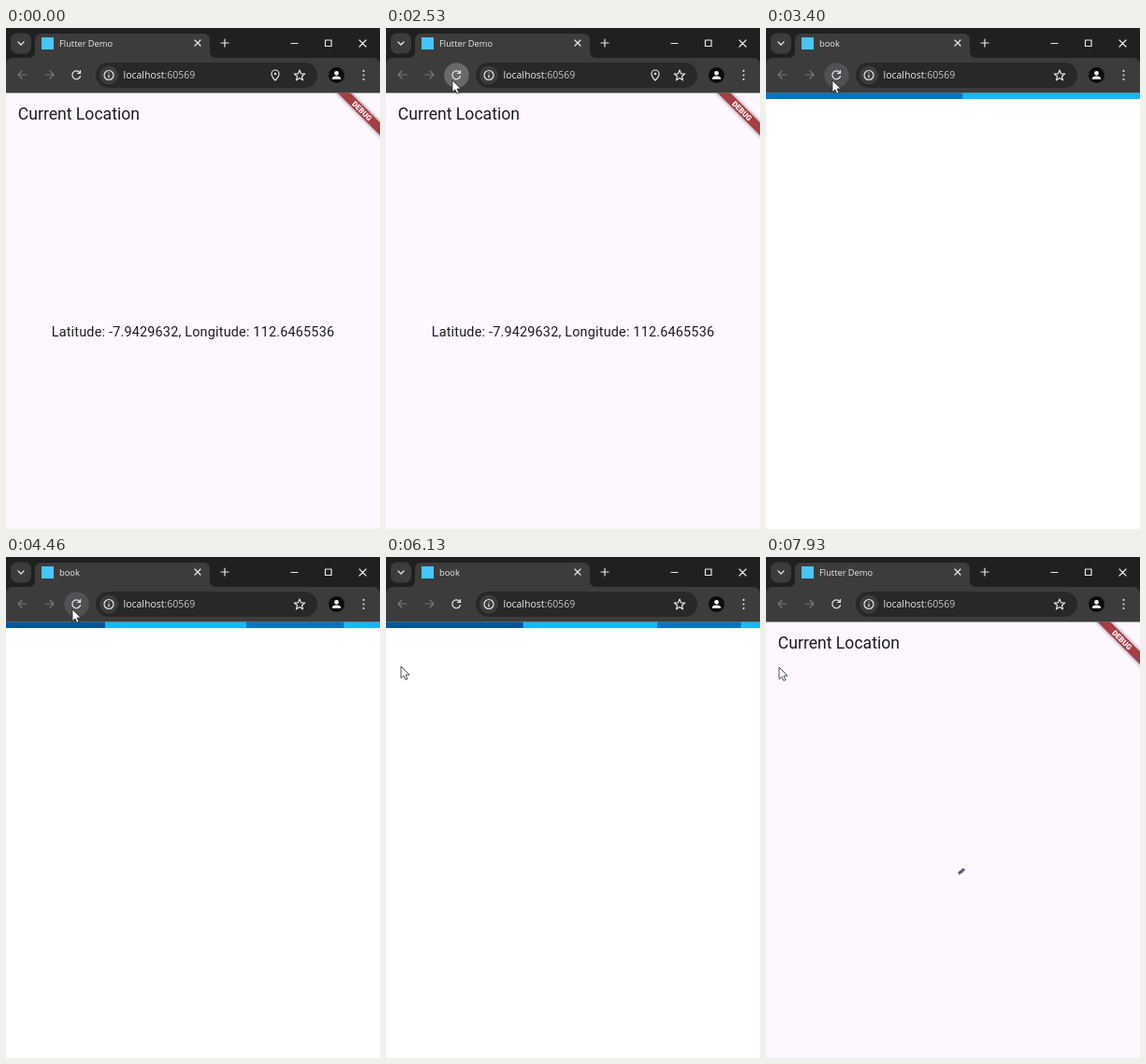
Recreate the animation shown at these times as an HTML page. Size 400 by 536 pixels, loop 8 s.

```html
<!DOCTYPE html>
<html lang="en">
<head>
<meta charset="utf-8">
<title>Current Location</title>
<style>
  html, body { margin: 0; width: 100%; height: 100%; overflow: hidden; background: #fff; }
  svg { display: block; width: 100%; height: 100%; }
  .ui { font-family: "Open Sans", "Noto Sans", sans-serif; fill: #ececec; }
  .app { font-family: Roboto, sans-serif; fill: #1d1b20; }
  .line { fill: none; stroke: #e8e8e8; stroke-width: 1.2; stroke-linecap: round; stroke-linejoin: round; }
  .dim { stroke: #777; }
  .dots { stroke-width: 2; }
  .strip { fill: #1f2020; }
  .bar { fill: #3c3c3c; }
  .pill { fill: #282828; }
</style>
</head>
<body>
<svg viewBox="0 0 400 536" preserveAspectRatio="none">
  <defs>
    <clipPath id="view"><rect y="69.5" width="400" height="466.5"/></clipPath>
    <filter id="soft" x="-30%" y="-100%" width="160%" height="300%"><feGaussianBlur stdDeviation="2"/></filter>
  </defs>

  <rect id="page" width="400" height="536"/>

  <g id="loader">
    <rect y="69.5" width="400" height="6.5" fill="#13b9fd"/>
    <rect id="first" y="69.5" height="6.5" fill="#0175c2"/>
    <rect id="second" y="69.5" height="6.5" fill="#02569b"/>
  </g>

  <g id="app" class="app" clip-path="url(#view)">
    <text x="12.8" y="98" font-size="17.6">Current Location</text>
    <text id="place" x="200" y="330.4" font-size="14.4" letter-spacing=".2" text-anchor="middle">Latitude: -7.9429632, Longitude: 112.6465536</text>
    <path id="spinner" fill="none" stroke="#65558f" stroke-width="3.2"/>
    <g transform="translate(400 69.5) rotate(45)">
      <rect x="-36" y="22.4" width="72" height="9.6" opacity=".5" fill="#000" filter="url(#soft)"/>
      <rect x="-36" y="22.4" width="72" height="9.6" fill="#a73d45"/>
      <text y="30.1" font-size="8.1" font-weight="900" text-anchor="middle" fill="#fff">DEBUG</text>
    </g>
  </g>

  <g id="chrome">
    <rect class="strip" width="400" height="42"/>
    <path class="bar" d="M0 69.5V40q0-8 8-8H24q7 0 7-7V13q0-7 7-7H211q7 0 7 7V25q0 7 7 7H392q8 0 8 8V69.5z"/>
    <rect class="bar" x="5" y="5.5" width="22" height="22" rx="7"/>
    <path class="line" d="M13 15l3 3 3-3"/>
    <rect x="38" y="10" width="13" height="13" fill="#47c5fb"/>
    <text id="tab" class="ui" x="57" y="20" font-size="9.3"></text>
    <path class="line" d="M202 13l6 6m0-6l-6 6M230 16h8m-4-4v8M305 16.5h7M341.5 13h6.500v6.500h-6.500zM378 13l7 7m0-7l-7 7"/>
    <path class="line dim" d="M22 50H13m4-4l-4 4 4 4M42 50h9m-4-4l4 4-4 4"/>
    <circle id="hover" cx="75.5" cy="50.5" r="13.3"/>
    <path class="line" d="M78.8 47.7A4.4 4.4 0 1 0 79.5 51.5M79.5 45.5v3h-3"/>
    <rect class="pill" x="96" y="37" width="237" height="27" rx="13.5"/>
    <circle class="bar" cx="110" cy="50.5" r="10"/>
    <circle class="line" cx="110" cy="50.5" r="5"/>
    <path class="line" d="M110 50.3v2.7M110 48v.1"/>
    <text class="ui" x="125.5" y="54" font-size="10.5">localhost<tspan fill="#c7c7c7">:60569</tspan></text>
    <g id="pin" class="line">
      <path d="M288 56q-4-4-4-7a4 4 0 0 1 8 0q0 3-4 7z"/>
      <circle cx="288" cy="49" r=".7"/>
    </g>
    <path id="star" class="line"/>
    <circle cx="353.5" cy="50.5" r="8.5" fill="#0c0c0c"/>
    <path d="M348.8 54.8q0-3.300 4.700-3.300t4.700 3.300z" fill="#fff"/>
    <circle cx="353.5" cy="48.3" r="2.4" fill="#fff"/>
    <path class="line dots" d="M382.5 45.800v.1m0 4.500v.1m0 4.500v.1"/>
  </g>

  <path id="cursor" d="M0 0V12.6L2.9 9.9 4.9 14.3 7 13.4 5 9.100H9z" fill="#fff" stroke="#222" stroke-width=".8"/>
</svg>

<script>
const LOOP = 8000, TICK = 200 / 3;
const ENTER = 60, PRESS = 2460, RELEASE = 2930, RELOAD = 3260, LEAVE = 5214, READY = 6860;
const LOADER_START = 2750;
const stalls = [[4030, 4530], [6130, 6460], [7330, 7660]];  // the page hangs while it loads

const $ = id => document.getElementById(id);
const show = (id, on) => { $(id).style.display = on ? "" : "none"; };
const clamp = v => Math.max(0, Math.min(1, v));
const progress = (t, from, to) => clamp((t - from) / (to - from));
const mix = (a, b, k) => a + (b - a) * k;

function bezier(x1, y1, x2, y2) {
  const curve = (a, b, s) => 3 * a * s * (1 - s) ** 2 + 3 * b * s * s * (1 - s) + s ** 3;
  return x => {
    let lo = 0, hi = 1;
    for (let i = 0; i < 22; i++) {
      const mid = (lo + hi) / 2;
      if (curve(x1, x2, mid) < x) lo = mid; else hi = mid;
    }
    return curve(y1, y2, (lo + hi) / 2);
  };
}
const easeOut = bezier(0, 0, .58, 1);
const easeIn = bezier(.42, 0, 1, 1);
const fastOutSlowIn = bezier(.4, 0, .2, 1);

function screenTime(t) {
  const tick = Math.floor((t + 7) / TICK) * TICK;
  const stall = stalls.find(([from, to]) => tick > from && tick < to - 7);
  return stall ? stall[0] : tick;
}

function drawLoader(t) {
  const phase = (t - LOADER_START) % 2000 / 2000;
  const place = (id, start, p) => {
    $(id).setAttribute("x", mix(start, 400, p));
    $(id).setAttribute("width", mix(400, 40, p));
  };
  place("first", -400, easeOut(phase));
  place("second", -600, easeIn(phase));
}

function drawSpinner(t) {
  const cycle = t % 1333 / 1333, turn = 2 * Math.PI;
  const head = fastOutSlowIn(clamp(cycle * 2));
  const tail = fastOutSlowIn(clamp(cycle * 2 - 1));
  const from = turn * (-.25 + tail * .75 + t / 2222 + cycle * .25);
  const sweep = Math.max(.001, (head - tail) * .75 * turn);
  const point = a => `${200 + 14.4 * Math.cos(a)} ${325.4 + 14.4 * Math.sin(a)}`;
  $("spinner").setAttribute("d",
    `M${point(from)}A14.4 14.4 0 ${sweep > Math.PI ? 1 : 0} 1 ${point(from + sweep)}`);
}

// The pointer glides in to the reload button, clicks it, then curves away to the left.
function drawCursor(t) {
  const arrive = easeOut(progress(t, ENTER, 1460));
  const leave = progress(t, LEAVE, 6130);
  const drift = progress(t, 6460, READY);
  const x = mix(400, 71, arrive) - 55 * leave - 2 * drift;
  const y = mix(300, 56, arrive) + 61 * leave ** 1.7 + drift;
  $("cursor").setAttribute("transform", `translate(${x} ${y})`);
  show("cursor", t >= ENTER);

  const pressed = t >= PRESS && t < RELEASE;
  $("hover").setAttribute("fill", pressed ? "#6a6a6a" : "#505055");
  $("hover").setAttribute("opacity", progress(t, 1330, 1460) - progress(t, 5600, 5800));
}

function draw(now) {
  const t = screenTime(now % LOOP);
  const located = t < RELOAD - 7, ready = t >= READY, loading = !located && !ready;

  show("app", !loading);
  show("loader", loading);
  show("place", located);
  show("pin", located);
  show("spinner", ready);
  $("page").setAttribute("fill", loading ? "#fff" : "#fef7ff");
  $("tab").textContent = loading ? "book" : "Flutter Demo";
  if (loading) drawLoader(t);
  if (ready) drawSpinner(t - READY);
  drawCursor(t);
}

const starPoints = Array.from({ length: 10 }, (_, i) => {
  const r = i % 2 ? 2.6 : 6, a = (i * 36 - 90) * Math.PI / 180;
  return `${314 + r * Math.cos(a)} ${51 + r * Math.sin(a)}`;
});
$("star").setAttribute("d", `M${starPoints.join("L")}z`);

const begin = performance.now();
function loop() {
  draw(performance.now() - begin);
  requestAnimationFrame(loop);
}
loop();
</script>
</body>
</html>
```
